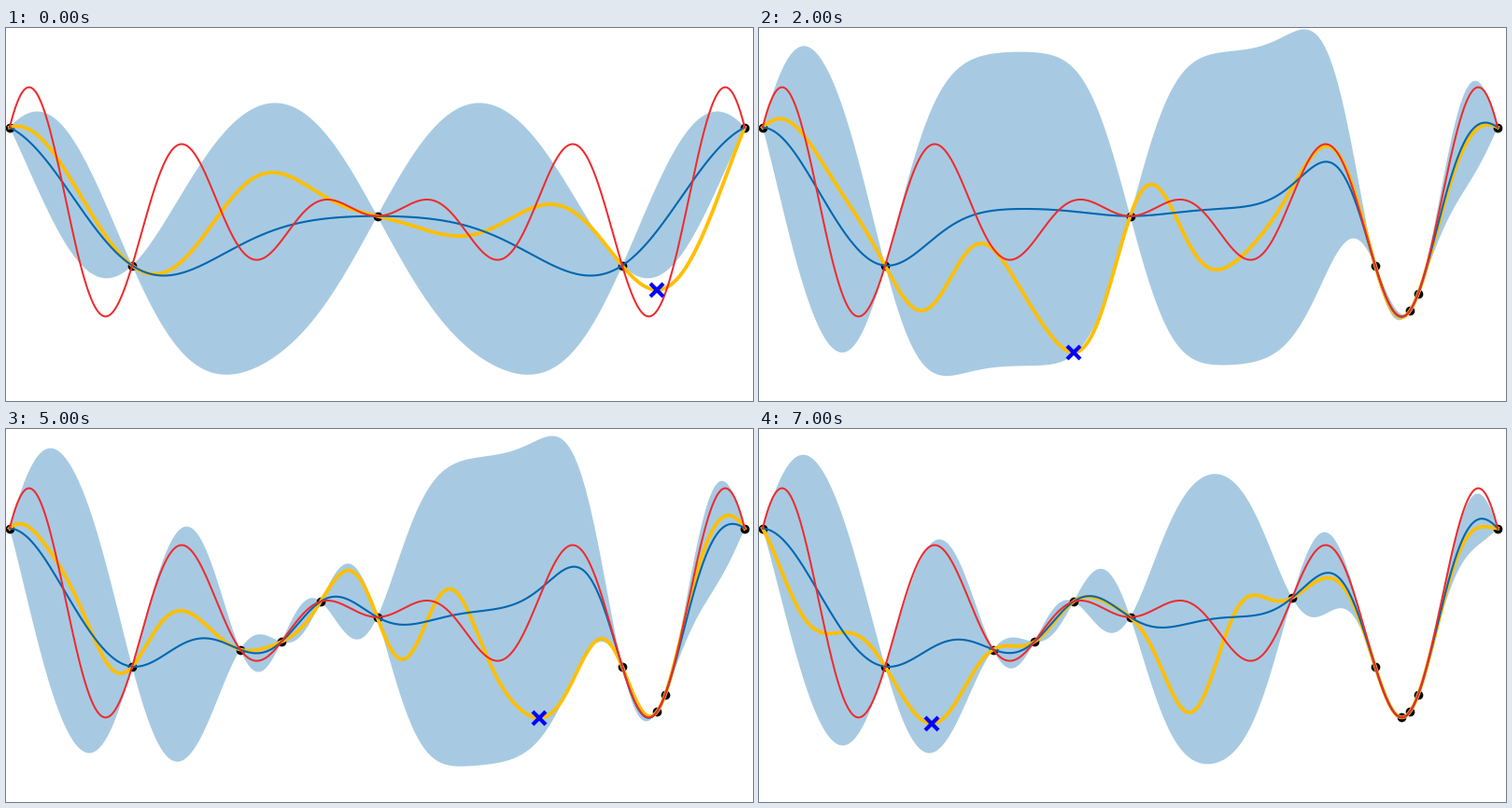
A matplotlib script for the animation above (8000 ms loop, 800 px wide and 400 px high).

```python
import numpy as np
import matplotlib.pyplot as plt
from matplotlib.animation import FuncAnimation

W, H, DPI = 800, 400, 100
X0, Y0, SX, SY = 397.5, 201.7, 26.24, 9.75   # data units to pixels
BAND, MEAN, TRUTH = "#a7cae2", "#0067b1", "#f02a2d"
SAMPLE, MARK = "#ffbf00", "#0000ff"

grid = np.linspace(-15, 15, 1201)
known = [-15, -10, 0, 10, 15]
steps = []


def objective(x):
    return x * np.sin(x)


def px(x):
    return X0 + SX * np.asarray(x)


def py(y):
    return Y0 - SY * np.asarray(y)


def posterior(x, turns, length, amp, prior):
    """Gaussian process through the objective at x and flat at the turns.

    Returns its mean and the half-width of its confidence band.
    """
    tx, ty = np.reshape(turns, (-1, 2)).T
    xs = np.concatenate([x, tx])
    ys = np.concatenate([objective(x), ty]) - prior
    target = np.concatenate([ys, np.zeros(len(tx))])

    def gap(a, b):
        return (a[:, None] - b) / length

    def value(a, b):
        return np.exp(-0.5 * gap(a, b) ** 2)

    def slope(a, b):
        return value(a, b) * gap(a, b)

    bend = value(tx, tx) * (1 - gap(tx, tx) ** 2)
    cov = np.block([[value(xs, xs), slope(xs, tx)],
                    [slope(xs, tx).T, bend]])
    cov += np.diag(np.repeat([1e-7, 1e-4, 1e-3], [len(x), len(tx), len(tx)]))
    cross = np.hstack([value(grid, xs), slope(grid, tx)])
    mean = prior + cross @ np.linalg.solve(cov, target)
    var = 1 - np.sum(cross * np.linalg.solve(cov, cross.T).T, axis=1)
    return mean, amp * np.sqrt(np.clip(var, 0, None))


def add_step(length, amp, prior, pick, *turns):
    """Store one step: turns are peaks and dips of the sampled path."""
    x = np.array(known, float)
    mean, half = posterior(x, (), length, amp, prior)
    sample, _ = posterior(x, turns, length, amp, prior)
    steps.append((x, mean, half, sample, pick))
    known.append(pick)


add_step(3.2, 15.8, 0.3, 11.42,
         (-14.7, 9.9), (-9.05, -6.3), (-4.29, 4.8), (3.33, -2.2),
         (7.07, 1.3), (11.42, -8.1))
add_step(2.17, 17.1, 0.85, 11.75,
         (-12.3, -0.3), (-6.9, -9.2), (-4.55, -10.5), (1.3, 0.5),
         (4.36, 1.9), (7.34, -0.4), (11.9, -10.7))
add_step(1.73, 17.28, 0.86, -2.31,
         (-14.3, 10.7), (-8.52, -10.4), (-6.08, -3), (-2.31, -15),
         (0.86, 3.5), (3.53, -5.9), (8.02, 7.7))
add_step(1.74, 17.2, 0.86, -5.59,
         (-13.2, 2.2), (-11.03, -7.1), (-8.67, -3.6), (-5.59, -14.7),
         (-1.28, 4.2), (2.34, -8.7), (7.53, 9.6), (14.12, 13.9))
add_step(1.7, 17.1, 0.78, -3.91, (-3.91, -9.8), (4.5, 3))
add_step(1.7, 16.97, 0.72, 6.61,
         (-14.6, 10.3), (-10.45, -6.3), (-8.02, 0.7), (-1.2, 5.1),
         (1.01, -4.7), (2.95, 3.1), (6.61, -11.1), (9.16, -2.4),
         (14.35, 11.2))
add_step(1.82, 16.8, 0.5, 11.07, (3, -3.5), (11.07, -11))
add_step(1.8, 16.66, 0.55, -8.1,
         (-12.3, -1.8), (-8.1, -11.7), (2.42, -10.5), (5.05, 2.4),
         (8.06, 4.3), (14.4, 9.9))

fig = plt.figure(figsize=(W / DPI, H / DPI), dpi=DPI, facecolor="white")
ax = fig.add_axes([0, 0, 1, 1])
ax.set(xlim=(0, W), ylim=(H, 0))
ax.axis("off")

gx = px(grid)
band, = ax.fill([0, 0, 0], [0, 0, 0], color=BAND, lw=0)
dots, = ax.plot([], [], "o", color="black", ms=7, mew=0)
sample_line, = ax.plot([], [], color=SAMPLE, lw=2.8)
mean_line, = ax.plot([], [], color=MEAN, lw=1.5)
ax.plot(gx, py(objective(grid)), color=TRUTH, lw=1.45)
cross, = ax.plot([], [], "x", color=MARK, ms=10, mew=3)


def draw(i):
    x, mean, half, sample, pick = steps[i]
    upper = np.column_stack([gx, py(mean + half)])
    lower = np.column_stack([gx, py(mean - half)])
    band.set_xy(np.vstack([upper, lower[::-1]]))
    dots.set_data(px(x), py(objective(x)))
    sample_line.set_data(gx, py(sample))
    mean_line.set_data(gx, py(mean))
    cross.set_data([px(pick)], [py(np.interp(pick, grid, sample))])
    return band, dots, sample_line, mean_line, cross


anim = FuncAnimation(fig, draw, frames=len(steps), interval=1000,
                     repeat=True, repeat_delay=0, blit=False)
plt.show()
```
